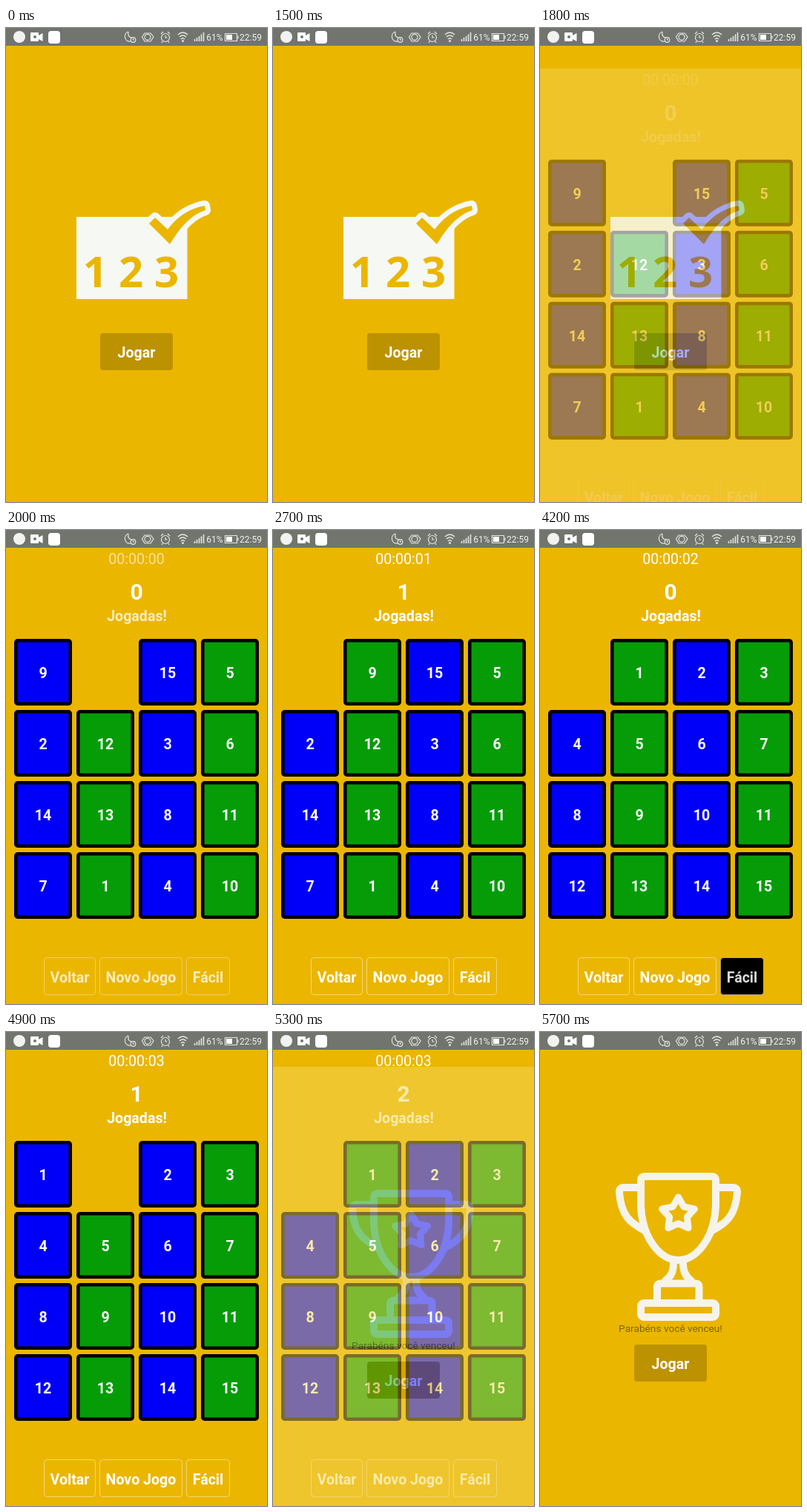
Animation, 352 px wide and 640 px high, one loop 5.8 s. Source, as an HTML page:

```html
<!DOCTYPE html>
<html lang="pt">
<head>
<meta charset="utf-8">
<title>Jogo dos números</title>
<style>
  html, body { margin: 0; width: 100%; height: 100%; overflow: hidden; background: #ebb600; }
  svg { display: block; width: 100vw; height: 100vh; }
  text { font: 700 19.6px Roboto, sans-serif; fill: #fff; text-anchor: middle; }
  .plain { font-weight: 400; }
  .digits { font: 700 58px "Open Sans", sans-serif; fill: #ebb600; }
  .status text { font: 400 12px Roboto, sans-serif; fill: #f2f2f0; }
  .line { fill: none; stroke: #f6f4ea; stroke-linecap: round; stroke-linejoin: round; }
  .icon { fill: none; stroke: #e4e5e2; stroke-width: 1.2; }
</style>
</head>
<body>
<svg viewBox="0 0 352 640">
  <g id="start">
    <rect y="24" width="352" height="616" fill="#ebb600"/>
    <rect x="95" y="255" width="149.5" height="111" fill="#f6f8f4"/>
    <path d="M193 264L201 256L218 272Q238 245 268 240L269 246Q243 254 221 292Z" fill="none" stroke="#f6f8f4" stroke-width="14" stroke-linejoin="round" id="halo"/>
    <path d="M193 264L201 256L218 272Q238 245 268 240L269 246Q243 254 221 292Z" fill="#ebb600"/>
    <text class="digits" x="168.5" y="350">1 2 3</text>
    <rect x="127" y="412" width="98" height="50" rx="4" fill="#bc9200"/>
    <text x="176" y="445">Jogar</text>
  </g>

  <g id="game">
    <rect class="back" y="24" width="352" height="640"/>
    <text id="clock" class="plain" x="176" y="46"></text>
    <text id="moves" x="176" y="94" style="font-size:30px"></text>
    <text id="movesLabel" x="176.5" y="123">Jogadas!</text>
    <g id="board"></g>
    <g id="buttons"></g>
  </g>

  <g id="win">
    <rect class="back" y="24" width="352" height="640"/>
    <g class="line" stroke-width="10">
      <path d="M141 195H232Q237 195 237 200V235C235 280 210 308 186.500 308C163 308 138 280 136 235V200Q136 195 141 195Z"/>
      <g id="handle"><path d="M136 210H113Q107 210 107 216C109 248 122 258 141 268"/>
        <path d="M180 311C180 322 178 329 169 336"/></g>
      <use href="#handle" transform="matrix(-1 0 0 1 373 0)"/>
      <path d="M158 366V344Q158 339.500 163 339.500H210Q214.500 339.500 214.500 344V366"/>
      <rect x="136" y="366" width="101" height="19" rx="4"/>
      <path id="star" stroke-width="9"/>
    </g>
    <text class="plain" x="176" y="405" style="font-size:13.700px;fill:#7d6418">Parabéns você venceu!</text>
    <rect x="127" y="422" width="98" height="50" rx="4" fill="#bc9200"/>
    <text x="176" y="455">Jogar</text>
  </g>

  <g class="status">
    <rect width="352" height="24" fill="#71756e"/>
    <circle cx="18" cy="12" r="8" fill="#f2f2f0"/>
    <path d="M34 6H43Q44 6 44 7V10L49.500 7V18L44 15V17Q44 18 43 18H34Q33 18 33 17V7Q33 6 34 6Z" fill="#fff"/>
    <circle cx="39" cy="12" r="2" fill="#71756e"/>
    <rect x="57" y="4" width="16" height="17" rx="4" fill="#fff"/>
    <g class="icon">
      <path d="M165 5C158 7 159 19 168 18M165 5C164 10 166 13 170 13"/>
      <circle cx="171.500" cy="16" r="3.300"/><path d="M171.500 14V16H173"/>
      <path d="M187 7H195L199 12L195 18H187L183.500 12Z"/><circle cx="191" cy="12.300" r="4"/>
      <circle cx="215" cy="13" r="5.500"/><path d="M215 10V13H217.500M209 8L212 5M221 8L218 5M211 18L210 20M219 18L220 20"/>
      <path d="M232 9Q238.500 3 245 9M234 12Q238.500 8 243 12M236 15Q238.500 12.500 241 15" stroke-width="1.500"/>
      <path d="M254.500 18V15M257.500 18V13M260.500 18V11M263.500 18V8.500M266.500 18V6" stroke-width="1.600"/>
      <path d="M295.500 7.500H311.500V17.500H295.500ZM313 10.500V14.500"/>
    </g>
    <circle cx="238.500" cy="17.500" r="1.500" fill="#e4e5e2"/>
    <rect x="297" y="9" width="8" height="7" fill="#fff"/>
    <text x="281.500" y="17">61%</text>
    <text x="330" y="17">22:59</text>
  </g>
</svg>

<script>
const LOOP = 5800, STEP = 100;
const $ = id => document.getElementById(id);

function add(parent, tag, attrs, content = "") {
  const node = document.createElementNS("http://www.w3.org/2000/svg", tag);
  for (const name in attrs) node.setAttribute(name, attrs[name]);
  node.textContent = content;
  return parent.appendChild(node);
}

const starPoints = Array.from({ length: 10 }, (_, i) => {
  const radius = i % 2 ? 12.5 : 23, angle = i * Math.PI / 5;
  return [186.5 + radius * Math.sin(angle), 246 - radius * Math.cos(angle)];
});
$("star").setAttribute("d", "M" + starPoints.join("L") + "Z");

const tiles = Array.from({ length: 16 }, (_, i) => {
  const col = i % 4, row = i >> 2, group = add($("board"), "g", {});
  add(group, "rect", {
    x: 13.3 + 84 * col, y: 149.3 + 96 * row, width: 73.4, height: 85.4, rx: 2.5,
    fill: col % 2 ? "#059c08" : "#0000f8", stroke: "#000", "stroke-width": 4.6
  });
  const label = add(group, "text", { x: 50 + 84 * col, y: 200 + 96 * row });
  return { group, label };
});

const buttons = [["Voltar", 51, 70], ["Novo Jogo", 126, 112], ["Fácil", 243, 59]].map(([name, x, width]) => {
  const box = add($("buttons"), "rect", {
    x: x + .5, y: 577.5, width: width - 1, height: 50, rx: 4,
    stroke: "#fff", "stroke-opacity": .45, fill: "none"
  });
  const label = add($("buttons"), "text", { x: x + width / 2, y: 610.5 }, name);
  return { box, label };
});

const first = [9, 0, 15, 5, 2, 12, 3, 6, 14, 13, 8, 11, 7, 1, 4, 10];
const shuffled = [6, 11, 3, 14, 9, 1, 0, 8, 13, 5, 10, 2, 4, 15, 7, 12];
const sorted = Array.from({ length: 16 }, (_, i) => i);
const swapTop = ([a, b, ...rest]) => [b, a, ...rest];

// [start time, board, move count]
const states = [
  [0, first, 0], [2500, swapTop(first), 1], [3200, shuffled, 0],
  [4200, sorted, 0], [4500, swapTop(sorted), 1], [5100, sorted, 2]
];

function enter(screen, time, start, duration) {
  const p = Math.max(0, Math.min(1, (time - start) / duration));
  const tint = (from, to) => Math.round(from + (to - from) * p);
  screen.style.display = p > 0 ? "" : "none";
  screen.style.opacity = p;
  screen.setAttribute("transform", `translate(0 ${46 * (1 - p)})`);
  screen.querySelector(".back").setAttribute("fill", `rgb(${tint(253, 235)},${tint(246, 182)},${tint(180, 0)})`);
}

function press(button, active) {
  button.box.setAttribute("fill", active ? "#000" : "none");
  button.label.style.opacity = active ? .85 : 1;
}

function render(now) {
  const time = Math.floor(now % LOOP / STEP) * STEP;
  const [, board, moves] = states.filter(state => state[0] <= time).pop();
  tiles.forEach(({ group, label }, i) => {
    group.style.display = board[i] ? "" : "none";
    label.textContent = board[i];
  });
  $("moves").textContent = moves;
  $("clock").textContent = "00:00:0" + Math.max(0, Math.min(3, Math.floor((time - 1600) / 1000)));

  const settling = time < 2100;
  $("clock").style.opacity = settling ? .6 : 1;
  $("movesLabel").style.opacity = $("buttons").style.opacity = settling ? .75 : 1;
  press(buttons[1], time === 3200);
  press(buttons[2], time === 4200);

  enter($("game"), time, 1700, 300);
  enter($("win"), time, 5100, 400);
}

const began = performance.now();
function frame() {
  render(performance.now() - began);
  requestAnimationFrame(frame);
}
frame();
</script>
</body>
</html>
```
